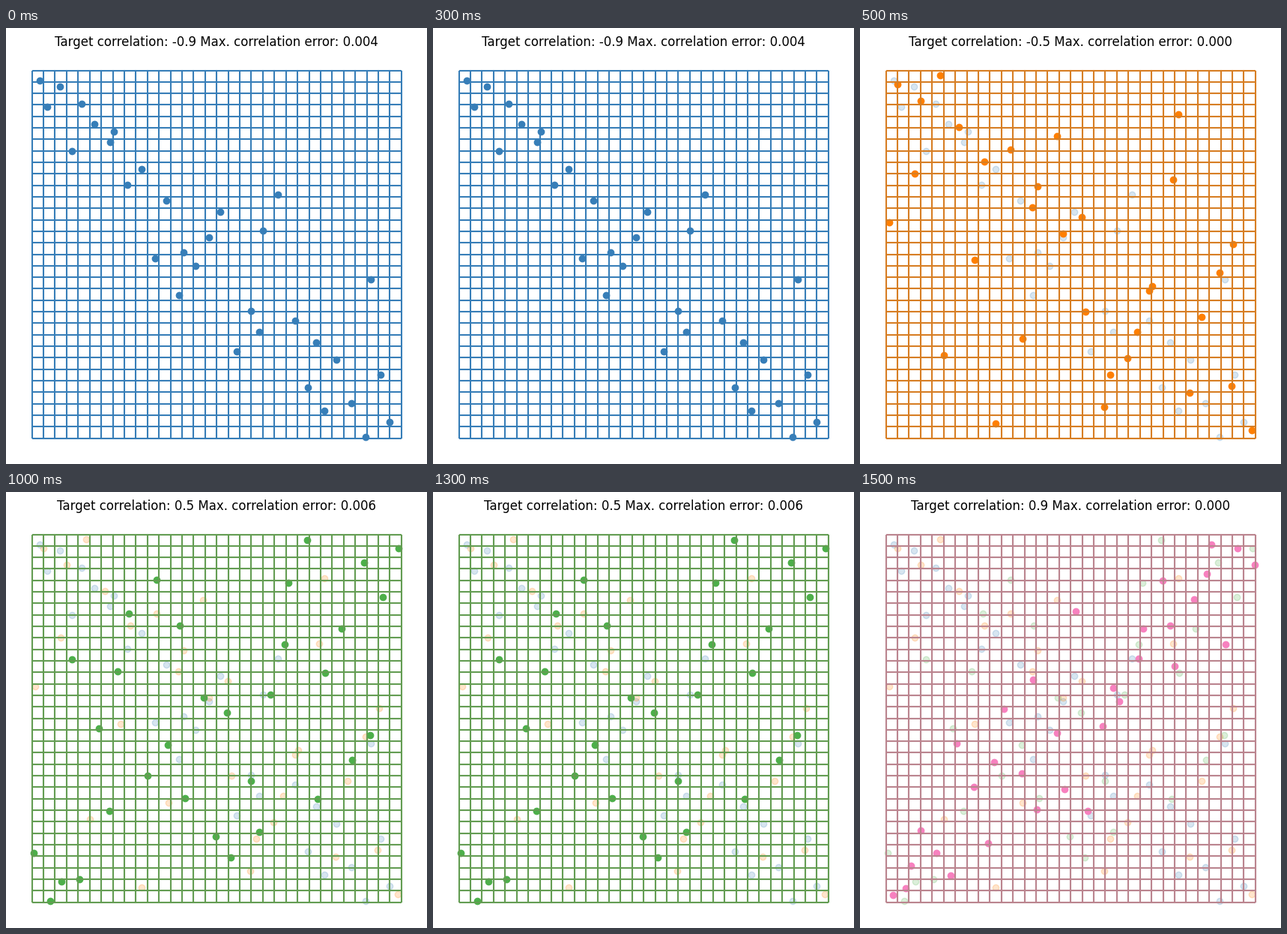
These frames come from a looping animation (562 by 581 pixels, 2000 ms). A matplotlib script:

```python
import matplotlib.pyplot as plt
import numpy as np
from matplotlib.animation import FuncAnimation

W, H, DPI = 562, 581, 100
CELLS = 32
FADED = 0.2
LEFT, RIGHT, TOP, BOTTOM = 34.66, 527.84, 56.55, 546.55

# target correlation, error, colour
SAMPLES = [
    (-0.9, 0.004, "#377eb8"),
    (-0.5, 0.000, "#ff7f00"),
    (0.5, 0.006, "#4daf4a"),
    (0.9, 0.000, "#f781bf"),
]

rng = np.random.default_rng(7)


def latin_hypercube(target, error):
    """One point per row and column, with the wanted correlation error."""
    column = np.arange(CELLS)
    while True:
        a, b = rng.standard_normal((2, CELLS))
        a.sort()
        mixed = target * a + np.sqrt(1 - target ** 2) * b
        row = mixed.argsort().argsort()
        x, y = (np.array([column, row]) + rng.random((2, CELLS))) / CELLS
        if round(abs(np.corrcoef(x, y)[0, 1] - target), 3) == error:
            return x, y


def make_layer(index, target, error, color):
    """Grid and dots of one sample; older grids lie over newer ones."""
    depth = 0.1 * index
    style = dict(colors=color, linewidth=1.5)
    cols = ax.vlines(np.linspace(LEFT, RIGHT, CELLS + 1), TOP, BOTTOM,
                     zorder=3 - depth, **style)
    rows = ax.hlines(np.linspace(TOP, BOTTOM, CELLS + 1), LEFT, RIGHT,
                     zorder=4 - depth, **style)
    x, y = latin_hypercube(target, error)
    dots = ax.scatter(LEFT + x * (RIGHT - LEFT), BOTTOM - y * (BOTTOM - TOP),
                      s=36, color=color, zorder=1 + depth)
    return cols, rows, dots


plt.rcParams["font.family"] = "DejaVu Sans"
fig = plt.figure(figsize=(W / DPI, H / DPI), dpi=DPI, facecolor="white")
ax = fig.add_axes([0, 0, 1, 1])
ax.axis("off")
layers = [make_layer(i, *sample) for i, sample in enumerate(SAMPLES)]
ax.set_xlim(0, W)
ax.set_ylim(H, 0)
title = ax.text(281.25, 23.67, "", fontsize=12, ha="center", va="baseline")


def update(step):
    for i, layer in enumerate(layers):
        for artist in layer:
            artist.set_visible(i <= step)
            artist.set_alpha(1 if i == step else FADED)
    target, error, _ = SAMPLES[step]
    title.set_text(f"Target correlation: {target} "
                   f"Max. correlation error: {error:.3f}")
    return [title, *(a for layer in layers for a in layer)]


anim = FuncAnimation(fig, update, frames=len(SAMPLES), interval=500,
                     repeat=True, repeat_delay=0)
plt.show()
```
